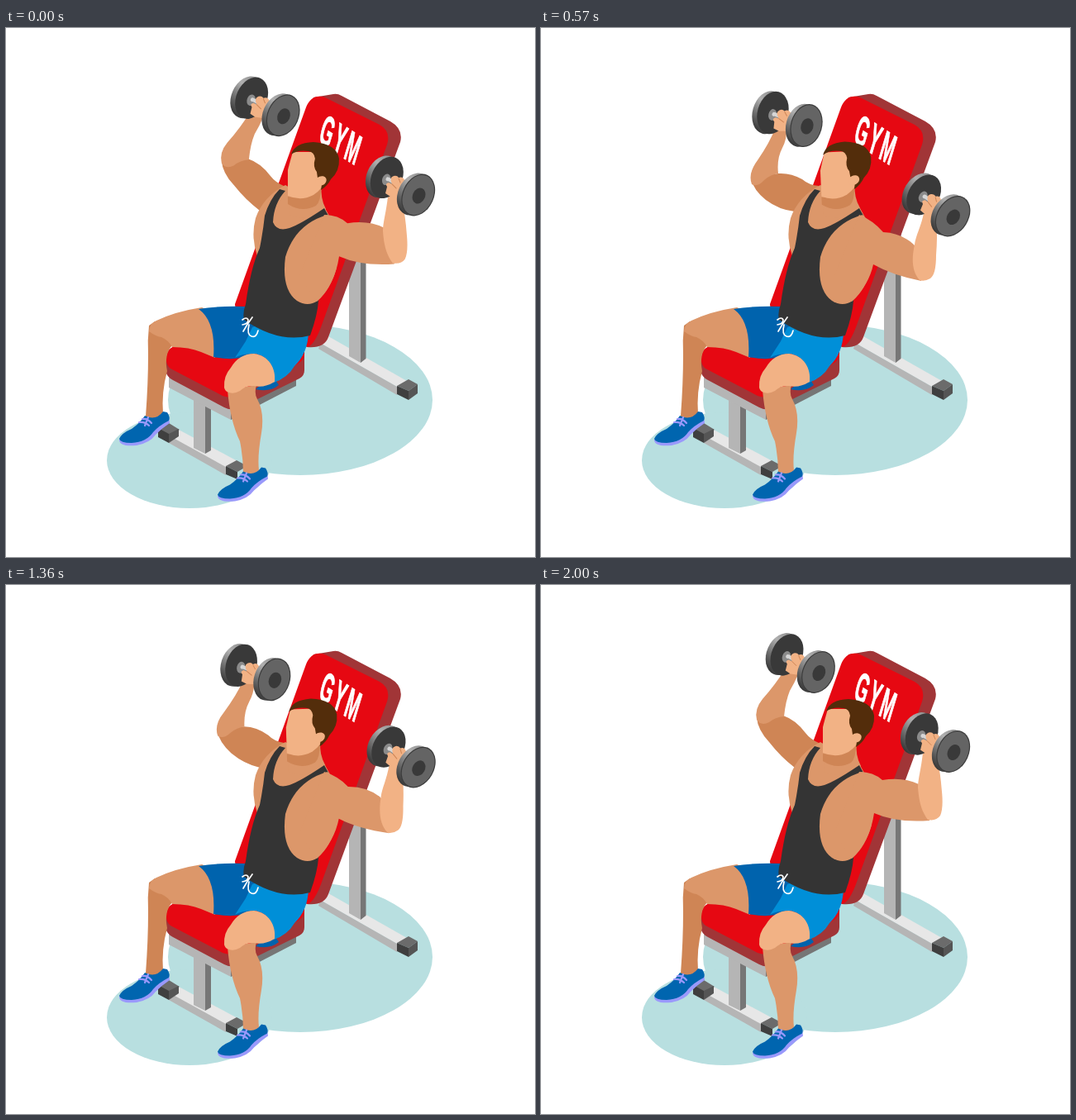
Recreate the animation shown at these times as an HTML page. Size 640 by 640 pixels, loop 2430 ms.

```html
<!DOCTYPE html>
<html lang="en">
<head>
<meta charset="utf-8">
<title>Dumbbell press</title>
<style>
html, body { margin: 0; width: 100%; height: 100%; overflow: hidden; background: #fff; }
svg { display: block; width: 100%; height: 100%; }
.red { fill: #e60812; } .maroon { fill: #a13537; }
.pale { fill: #e7e7e7; } .grey { fill: #b5b5b5; } .slate { fill: #767676; }
.cap { fill: #6b6b6b; } .black { fill: #3f3f3f; }
.light { fill: #f2b285; } .skin { fill: #dc976a; } .shade { fill: #cf8555; }
.navy { fill: #0063ad; } .blue { fill: #008fd8; } .tank { fill: #343434; } .hair { fill: #532d0b; }
.line { fill: none; stroke-linecap: round; stroke-linejoin: round; }
text { font: bold 40px "Liberation Sans", Arial, sans-serif; letter-spacing: 5px; fill: #fff; stroke: #fff; stroke-width: 1; }
</style>
</head>
<body>
<svg viewBox="0 0 640 640">
<defs>
  <linearGradient id="rim" x1=".6" y1="0" x2=".3" y2="1">
    <stop offset="0" stop-color="#8c8c8c"/><stop offset=".35" stop-color="#b0b0b0"/><stop offset="1" stop-color="#303030"/>
  </linearGradient>
  <g id="shoe">
    <path fill="#9a99fb" d="M137 498Q137 507 158 505Q174 502 181 492Q189 484 198 478L197 470L150 488Z"/>
    <path fill="#0065af" d="M137 497Q140 490 152 485Q162 478 168 469Q181 476 190 464L195 465Q199 471 197 475Q185 481 178 489Q170 501 152 502Q138 502 137 497Z"/>
    <path class="line" stroke="#9a99fb" stroke-width="2.2" d="M161 477Q168 476 173 481M165 473Q171 472 176 478M168 481L172 471"/>
  </g>
  <g id="dumbbell">
    <g transform="translate(-19 -10.5)">
      <ellipse rx="19" ry="26.5" transform="translate(-2.7 -.5) rotate(24)" fill="url(#rim)"/>
      <ellipse rx="18.5" ry="26.3" transform="translate(2.7 .5) rotate(24)" fill="#393939"/>
      <ellipse cx="3" cy="2" rx="5" ry="7" transform="rotate(20)" fill="#8b8b8b"/>
    </g>
    <path class="line" stroke="#d6d6d6" stroke-width="5" d="M-15 -8L17 10"/>
    <path class="line" stroke="#8b8b8b" stroke-width="1.5" d="M-15 -5L16 12"/>
    <path class="light" d="M-18 9L-16 1Q-19 -3 -14 -4L-10 -2Q-14 -10 -8 -12Q-4 -13 -2 -10Q3 -12 5 -7Q9 -8 9 -3Q11 2 8 7L3 15L-12 13Z"/>
    <path class="line" stroke="#cf8555" stroke-width="1" d="M-10 -2L-5 3M-2 -9L0 -4M5 -6L5 -1"/>
    <g transform="translate(19 10.5)">
      <ellipse rx="19" ry="26.5" transform="translate(-2.7 -.5) rotate(24)" fill="url(#rim)"/>
      <ellipse rx="19" ry="26.5" transform="translate(2.7 .5) rotate(24)" fill="#3c3c3c"/>
      <ellipse rx="17.8" ry="25.2" transform="translate(2.7 .5) rotate(24)" fill="#646464"/>
      <ellipse rx="7.5" ry="9.8" transform="translate(3.5 1.5) rotate(24)" fill="#393939"/>
    </g>
  </g>
</defs>

<g fill="#b8dfe0"><ellipse cx="356" cy="450" rx="160" ry="91"/><ellipse cx="222" cy="523" rx="100" ry="58"/></g>

<!-- rear support -->
<path class="pale" d="M390 373L485 427L473 434L380 381Z"/>
<path class="grey" d="M380 381L473 434V444L378 388Z"/>
<path class="cap" d="M473 433L487 425L498 431L487 439Z"/>
<path class="black" d="M473 433L487 439V450L473 443Z"/>
<path fill="#555" d="M487 439L498 431V442L487 450Z"/>
<path class="grey" d="M415 230H429V405L415 397Z"/>
<path class="slate" d="M429 230H435.500V400L429 405Z"/>

<!-- backrest -->
<path class="maroon" d="M372 84L396 80Q401 79 406 82L465 113Q481 122 477 138L390 374Q385 388 364 386L300 350Z"/>
<path class="red" d="M277 334L363 96Q370 79 386 84L452 117Q466 125 461 141L381 362Q373 383 365 386L300 352Q276 342 277 334Z"/>
<text transform="matrix(.45 .29 -.36 1.2 377 137)">GYM</text>

<!-- front support and seat -->
<path class="pale" d="M209 486L280 524L266 532L197 494Z"/>
<path class="grey" d="M197 493L266 531V541L197 502Z"/>
<path class="grey" d="M227 444H241V515L227 508Z"/>
<path class="slate" d="M241 452H248V511L241 515Z"/>
<path class="cap" d="M184 484L197 478L210 486L197 493Z"/>
<path class="black" d="M184 484L197 491V502L184 495Z"/>
<path fill="#555" d="M197 491L209 485V494L197 502Z"/>
<path class="cap" d="M266 530L279 523L292 530L280 537Z"/>
<path class="black" d="M266 530L280 537V546L266 540Z"/>
<path class="grey" d="M197 422L272 462V474L197 435Z"/>
<path class="slate" d="M272 462L351 424V433L272 474Z"/>
<path class="maroon" d="M193 397V414Q194 422 202 426L264 459Q274 464 284 459L355 424Q361 421 361 414V393L300 390Z"/>
<path class="red" d="M194 399Q193 388 208 383L361 392Q362 402 352 407L280 444Q272 449 262 445L199 412Q193 407 194 399Z"/>

<!-- far leg -->
<path class="shade" d="M173 360Q171 378 172 395Q172 430 169 470Q179 477 190 467Q188 440 195 415Q191 395 201 384L205 372L180 355Z"/>
<path class="skin" d="M237 338Q205 343 182 354Q174 357 173 367Q181 373 188 374Q197 378 201 386Q222 386 236 392L253 399V345Z"/>
<use href="#shoe"/>
<path class="navy" d="M233 340Q258 336 289 337L310 358L295 397Q274 403 251 398Q254 355 233 340Z"/>

<!-- far arm -->
<path id="farUpper" class="shade"/>
<path id="farFore" class="skin"/>
<use id="farBell" href="#dumbbell"/>

<!-- near leg -->
<path class="skin" d="M268 438Q271 475 283 500Q287 520 287 538Q297 544 306 535Q304 518 309 490Q313 465 304 449Q300 442 303 432Z"/>
<use href="#shoe" x="119" y="67.5"/>
<path class="navy" d="M302 437Q312 428 325 424L330 432Q319 441 302 437Z"/>
<path class="blue" d="M298 362L290 379L277 399Q285 394 300 394C318 396 326 412 324 429Q341 423 349 409Q365 394 366 368L320 355Z"/>
<path class="light" d="M264 435Q263 421 272 411Q282 394 300 394C318 396 327 412 325 428Q312 436 300 433Q290 432 283 439Q276 443 270 441Q265 440 264 435Z"/>

<!-- torso -->
<path class="skin" d="M338 190Q311 204 302 230Q296 252 304 276L330 300L380 320L398 240L386 218Z"/>
<g id="head">
  <path class="skin" d="M343 201L382 190Q380 206 387 219Q365 236 342 226Z"/>
  <path class="shade" d="M341 204Q362 207 381 193Q381 210 375 215Q358 224 341 213Z"/>
  <path class="light" d="M347 150Q343 164 341 172V203Q357 210 372 202Q384 194 388 182L385 150Z"/>
  <path class="hair" d="M345 153Q349 139 372 138Q400 140 403 158Q404 173 393 183Q389 191 381 196Q384 186 377 181L376 174Q371 168 374 158Q373 150 366 149Q353 147 345 153Z"/>
  <ellipse class="light" cx="381" cy="185" rx="7" ry="5.500" transform="rotate(-25 381 185)"/>
</g>
<path class="tank" d="M331 195L338 197Q324 212 323 235Q328 247 343 242Q357 237 385 218L390 227L378 330Q377 347 368 372Q330 382 288 353Q286 345 290 334Q296 290 307 266Q311 246 313 227Q319 207 331 195Z"/>
<path class="skin" d="M389 226Q350 237 338 277Q333 316 352 330Q365 338 377 330Q393 316 400 290L402 240Z"/>
<path class="line" stroke="#fff" stroke-width="1.7" d="M286 353Q291 349 293 353Q293 358 286 359M298 350Q292 358 287 367M294 359Q291 371 297 373Q303 375 305 366"/>

<!-- near arm -->
<path id="nearUpper" class="skin"/>
<path id="nearFore" class="light"/>
<use id="nearBell" href="#dumbbell"/>
</svg>

<script>
// Each part has a raised, a middle and a lowered pose.
const poses = {
  farUpper: [
    "M261 160Q262 175 276 190Q290 208 307 221L314 226L338 192Q326 187 320 179Q308 163 293 158Q280 156 261 160Z",
    "M254 182Q257 196 272 208Q288 220 307 222L314 226L336 191Q324 190 316 183Q302 175 287 176Q268 178 254 182Z",
    "M253 204Q258 214 274 221Q288 232 304 231L314 228L335 193Q322 191 310 188Q298 186 285 190Q268 192 253 204Z"],
  farFore: [
    "M295 102Q284 120 268 138Q258 150 261 163Q266 171 276 166Q283 160 294 159Q296 140 301 128Q307 118 312 106Z",
    "M283 122Q277 138 262 160Q250 176 255 189Q262 193 270 184Q278 177 287 176Q285 158 292 145Q297 136 297 124Z",
    "M273 138Q268 155 258 178Q250 198 254 207Q260 212 264 203Q272 194 285 190Q280 170 285 155Q290 146 289 136Z"],
  nearUpper: [
    "M385 226Q402 226 413 236Q438 232 457 241L472 262L470 285Q430 288 403 276Q398 310 376 331L355 300Z",
    "M385 226Q402 233 414 247Q436 248 451 262L465 280L460 306Q425 299 402 286Q397 310 376 331L355 300Z",
    "M385 226Q404 238 414 258Q430 262 444 277L455 295L445 325Q418 317 397 299Q393 315 376 331L355 300Z"],
  nearFore: [
    "M462 203C460 222 456 235 456 245C457 258 459 272 468 284Q478 286 483 279Q487 270 485 250Q483 225 480 215Q479 208 478 203Z",
    "M463 224C460 240 453 252 452 262C448 280 449 295 458 305Q464 307 471 303Q478 298 478 275Q480 250 478 235Q476 228 475 222Z",
    "M457 240C453 255 446 268 444 280C437 293 435 308 439 319Q448 327 458 324Q465 318 466 300Q470 280 469 262Q470 250 472 242Z"],
  farBell: ["translate(313.8 94.5) rotate(0)", "translate(298 110.2) rotate(-8)", "translate(288.5 127.3) rotate(-15)"],
  nearBell: ["translate(477 190.5) rotate(0)", "translate(478 214) rotate(7.5)", "translate(475 235) rotate(14)"],
  head: ["rotate(0 358 240)", "rotate(-2.6 358 240)", "rotate(-5 358 240)"]
};
const number = /-?\d+(\.\d+)?/g;
const parts = Object.entries(poses).map(([id, keys]) => ({
  node: document.getElementById(id),
  attr: keys[0][0] === "M" ? "d" : "transform",
  form: keys[0],
  values: keys.map(k => k.match(number).map(Number))
}));

const LOOP = 2430, STEPS = 34;
const ease = x => (1 - Math.cos(Math.PI * Math.min(1, Math.max(0, x)))) / 2;

// Quadratic curve through the three poses
function mix([a, b, c], p) {
  const q = 1 - p;
  return a.map((v, i) => v * q * (1 - 2 * p) + b[i] * 4 * p * q + c[i] * p * (2 * p - 1));
}

function draw(time) {
  // The lift happens twice per loop, in even steps
  const step = Math.floor(((time % LOOP) + 8) * STEPS / LOOP) % (STEPS / 2);
  const lowered = ease((step + .35) / 5.75) - ease((step - 6) / 4);
  for (const { node, attr, form, values } of parts) {
    const pose = mix(values, lowered);
    let i = 0;
    node.setAttribute(attr, form.replace(number, () => pose[i++].toFixed(2)));
  }
}

let start;
function tick(time) {
  start ??= time;
  draw(time - start);
  requestAnimationFrame(tick);
}
draw(0);
requestAnimationFrame(tick);
</script>
</body>
</html>
```
